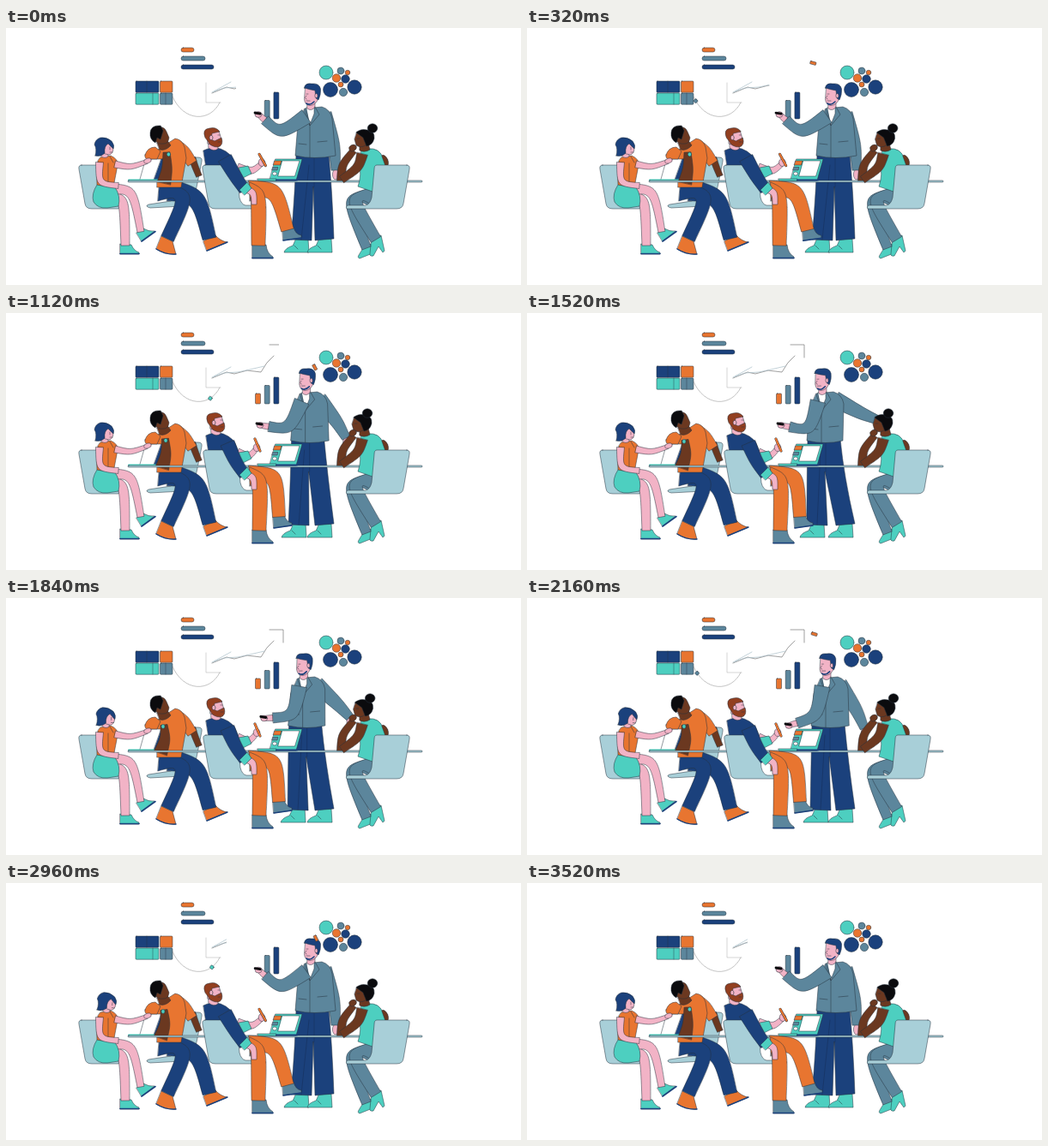
Animation, 600 px wide and 300 px high, one loop 3600 ms. Source, as an HTML page with a canvas:

```html
<!DOCTYPE html>
<html lang="en">
<head>
<meta charset="utf-8">
<title>Team meeting</title>
<style>
  html, body { margin: 0; width: 100%; height: 100%; overflow: hidden; background: #fff; }
  canvas { display: block; }
</style>
</head>
<body>
<canvas id="stage" width="600" height="300"></canvas>
<script>
const ctx = document.getElementById('stage').getContext('2d');
const NAVY = '#1b417c', ORANGE = '#e87530', TEAL = '#4dcfc0', SLATE = '#5c869c', CHAIR = '#a8cfd8',
      PINK = '#f2b3c6', BROWN = '#6b3820', RUST = '#923f20', BLACK = '#0b0b0e', INK = '#25313d';
const LOOP = 3600, STEP = 80;

const ramp = (t, from, to) => Math.max(0, Math.min(1, (t - from) / (to - from)));
const ease = (t, from, to) => { const u = ramp(t, from, to); return u * u * (3 - 2 * u); };

function shape(d, fill, stroke = INK, width = .5) {
  const path = d instanceof Path2D ? d : new Path2D(d);
  if (fill) { ctx.fillStyle = fill; ctx.fill(path); }
  if (stroke) { ctx.strokeStyle = stroke; ctx.lineWidth = width; ctx.stroke(path); }
}
const line = (d, color, width) => shape(d, null, color, width);

function oval(x, y, rx, ry, fill, turn = 0) {
  const path = new Path2D();
  path.ellipse(x, y, rx, ry, turn, 0, 7);
  shape(path, fill);
}

function box(x, y, w, h, r, fill) {
  const path = new Path2D();
  path.roundRect(x, y, w, h, r);
  shape(path, fill);
}

// Limb through start, joint and end, tapering from width w0 to w1
function limb(fill, w0, w1, x0, y0, x1, y1, x2, y2) {
  const edge = side => {
    const offset = (x, y, dx, dy, w) => {
      const k = side * w / 2 / Math.hypot(dx, dy);
      return `${x - dy * k} ${y + dx * k} `;
    };
    const joint = offset(x1, y1, x2 - x0, y2 - y0, (w0 + w1) / 2);
    return [offset(x0, y0, x1 - x0, y1 - y0, w0), joint + joint, offset(x2, y2, x2 - x1, y2 - y1, w1)];
  };
  const [a, b, c] = edge(1), [d, e, f] = edge(-1);
  shape(`M${a}C${b}${c}L${f}C${e}${d}Z`, fill);
}

function at(x, y, draw, turn = 0, flip = 1) {
  ctx.save();
  ctx.translate(x, y);
  ctx.rotate(turn);
  ctx.scale(flip, 1);
  draw();
  ctx.restore();
}

const chair = (x, flip, back, reach) => at(x, 160, () =>
  shape(`M4 0H${back - 3}Q${back} 0 ${back} 5L${back + 3} 38Q${back + 5} 46 ${back + 10} 47H${reach - 2}
    Q${reach + 1} 49 ${reach - 1} 51H16Q9 51 8 45L1 5Q0 0 4 0Z`, CHAIR), 0, flip);

function charts(t, handY) {
  [ORANGE, SLATE, NAVY].forEach((color, i) => box(204, 23 + 10 * i, 15 + 13 * i - 3 * (i > 1), 5, 2.5, color));
  [NAVY, ORANGE, TEAL, SLATE].forEach((color, i) =>
    box(i % 2 ? 179.5 : 151, i < 2 ? 62 : 76, i % 2 ? 14.5 : 27, 13.2, 1, color));
  line('M164 62V75M171 76V89M186 76V89', INK, .4);
  line('M233 64V87H250', '#aaa');
  line('M194 80C207 110 238 110 249 87', '#888');

  const edge = 268 + 67 * ramp(t, 0, 1500) - 78 * ease(t, 2250, 2960) + 11 * ramp(t, 3520, 3600);
  ctx.save();
  ctx.beginPath();
  ctx.rect(235, 30, edge - 235, 60);
  ctx.clip();
  line('M240 76L257 69 266 71 281 67 297 69 304 58 312 50M307 37H323V52', '#777', .7);
  line('M240 75L254 70 270 69 284 66 301 62M242 74L262 63', '#a9bfc9', .7);
  ctx.restore();

  const rise = ramp(handY, 103, 115);
  [ORANGE, SLATE, NAVY].forEach((color, i) => {
    const h = (12 + 9.5 * i) * (i ? 1 : rise);
    if (h) box(290.5 + 10.7 * i, 106 - h, 6, h, 1, color);
  });

  const bubble = (x, y, r, color) => oval(x, y, r, r, color);
  bubble(373, 52, 8, TEAL);
  bubble(390, 50, 4, SLATE);
  bubble(398, 52, 2.8, ORANGE);
  bubble(385, 58.5, 4.8, ORANGE);
  bubble(395.5, 59.5, 4.8, NAVY);
  bubble(390, 66, 3, ORANGE);
  bubble(378, 72, 8.5, NAVY);
  bubble(393, 75, 4.7, SLATE);
  bubble(406, 69, 8.2, NAVY);

  const u = ramp(t % 1800, 250, 1400), v = 1 - u;
  if (u > 0 && u < 1) {
    const bezier = (a, b, c, d) => a * v ** 3 + 3 * b * v * v * u + 3 * c * v * u * u + d * u ** 3;
    at(bezier(194, 207, 238, 249), bezier(80, 110, 110, 87),
      () => box(-2, -2, 4, 4, 1, u < .25 ? SLATE : TEAL), u * 2 + .6);
  }
}

function spark(t) {
  const u = ramp(t % 1800, 250, 1250);
  if (u > 0 && u < 1) at(331 + 33 * u, 39 + 28 * u, () => box(-3.5, -1.7, 7, 3.4, .6, ORANGE), .2 + u);
}

function gesture(t) {
  const drop = ease(t, 300, 1100), open = ease(t, 800, 1450), low = ease(t, 1560, 2100),
        settle = ease(t, 2200, 2640), raise = ease(t, 2400, 3000);
  return {
    lean: 360 - 11 * open + 5 * low + 6 * settle,
    hand: [295 + 2 * drop + 9 * low - 11 * raise, 101 + 30 * drop + 18 * low - 48 * raise],
    backHand: [384 + 25 * open - 16 * low - 9 * settle, 169 - 41 * open + 27 * low + 14 * settle],
    stride: 6 * open - 4 * low - 2 * settle
  };
}

// Elbow below the line from shoulder to hand, both arm bones of the same length
function elbow(sx, sy, hx, hy, bone) {
  const dx = hx - sx, dy = hy - sy, d = Math.hypot(dx, dy);
  const h = Math.sqrt(Math.max(0, bone * bone - d * d / 4)) / d;
  return [(sx + hx) / 2 + dy * h, (sy + hy) / 2 - dx * h];
}

function presenter({ lean, hand: [hx, hy], backHand: [bx, by], stride }) {
  const tilt = (360 - lean) / 11, hip = lean - 1, left = 344 - stride, right = 371;
  const [ex, ey] = elbow(lean - 13, 105, hx, hy, 33.5);
  oval(bx, by + 2, 3.6, 6, PINK);
  limb(SLATE, 19, 10, lean + 10, 101, (lean + 12 + bx) / 2 + 5, (103 + by) / 2 + 2, bx, by - 3);

  for (const x of [left, right])
    shape(`M${x - 6} 246L${x + 8} 246L${x + 9} 262H${x - 20}Q${x - 19} 257 ${x - 10} 254Z`, TEAL);
  line(`M${left - 8} 254l4 4M${right - 8} 254l4 4`);
  shape(`M${hip - 21} 147H${hip + 17}Q${hip + 21} 190 ${right + 11} 246L${right - 11} 248L${hip - 1} 185
    L${left + 12} 248L${left - 12} 247Q${hip - 22} 190 ${hip - 21} 147Z`, NAVY);
  line(`M${hip} 150V185M${hip - 6} 160L${left} 247`, '#142c56');

  shape(`M${lean - 12} 94L${lean + 8} 92Q${lean + 18} 95 ${lean + 20} 106L${hip + 25 - 5 * tilt} 149
    Q${hip} 154 ${hip - 22} 149L${lean - 20} 112Z`, SLATE);
  shape(`M${lean - 10} 93L${lean - 1} 91L${lean - 1} 100L${lean - 6} 113Z`, '#fff');
  shape(`M${lean - 9} 84H${lean}V92Q${lean - 4} 98 ${lean - 9} 94Z`, PINK);
  line(`M${lean - 12} 95L${lean - 6} 114L${lean + 5} 101L${lean} 92M${lean - 6} 114L${hip - 5} 151
    M${hip + 4} 133l11 -1M${hip - 18} 135l9 1`);

  at(lean - 5 - tilt, 78, () => {
    shape('M-6 -9Q1 -9 7 -7L9 4Q6 12 -1 12.5Q-7 12 -7.5 5Z', PINK);
    shape('M-7.5 -8Q-7 -14 1 -13Q10 -14 11.5 -7Q12 0 9 6L6 4L5 -5Q-1 -6 -7.5 -8Z', NAVY);
    oval(6.5, 1, 1.7, 2.5, PINK);
    line('M-5 10Q-1 13 4 8', NAVY, 1.6);
    line('M-5 -1h2M-5 1q-3 3 0 4M-5 7h4');
  }, -.05 * tilt);

  const cuff = [hx + (ex - hx) * .28, hy + (ey - hy) * .28];
  limb(PINK, 6, 7, hx, hy, hx + 3, hy + (ey - hy) * .15, ...cuff);
  oval(hx - 1, hy, 4, 3.4, PINK);
  line(`M${hx - 5} ${hy - 2}l6 1`, BLACK, 2.8);
  limb(SLATE, 12, 18, ...cuff, ex, ey, lean - 10, 103);
}

function restingMan(fold) {
  shape('M203 151H224Q229 151 228 156L222 186Q218 206 205 208L168 210Q161 208 166 206L192 202Z', CHAIR);
  shape('M181 243L194 249L198 264Q186 265 175 258Z', ORANGE);
  shape('M230 249L243 241Q250 249 258 250L234 260Z', ORANGE);
  line('M175 258Q186 265 198 264M234 260L258 250', NAVY, 1.4);
  limb(NAVY, 26, 16, 190, 189, 225, 196, 237, 246);
  limb(NAVY, 24, 16, 178, 190, 213, 193, 188, 246);
  limb(BROWN, 8, 7, 217, 152, 220, 161, 225, 173);
  limb(ORANGE, 16, 12, 198, 138, 208, 144, 217, 158);
  shape('M177 142L197 129Q205 130 208 139L210 152L204 186H176Z', ORANGE);
  shape('M176 134L187 130L192 137Q186 144 179 142Z', BROWN);
  shape('M174 117Q184 113 187 121L190 128Q189 135 184 135Q177 136 173 131Z', BROWN);
  shape('M180 114Q169 113 168 122Q167 130 174 134L176 128L180 130L183 120Z', BLACK);
  shape('M163 153H184L176 178H156Z', '#fff');
  shape('M181 153H186L178 178H172Z', NAVY);
  line('M143 177.5H180', TEAL, 1.8);
  limb(BROWN, 16, 8, 180 + 4 * fold, 181, 186 + 2 * fold, 164, 184 + 3 * fold, 148 - 3 * fold);
  shape('M162 148Q165 139 174 139L180 144L176 153H165Q161 152 162 148Z', ORANGE);
  oval(183 + 6.5 * fold, 150 - 2.5 * fold, 2.2, 2.4, TEAL);
}

function table() {
  box(142, 178, 343, 2, 1, CHAIR);
  shape('M314 153H345L338 178H307Z', TEAL);
  shape('M322 155H342L336.5 173H317Z', '#fff');
  shape('M313 155H321L319.5 160H311.5Z', ORANGE);
  shape('M311 162.5H317L316 166H310Z', SLATE);
  oval(313, 170, 2.6, 2, '#fff');
  shape('M293 176H315V178.5H294Z', TEAL);
  line('M315 177.5H339', NAVY, 2);
}

function seatedWoman(nod) {
  chair(84, 1, 26, 48);
  shape('M133 252L146 253Q149 260 155 262V264H133Z', TEAL);
  shape('M152 239L160 234Q167 238 173 237L158 249Z', TEAL);
  line('M133 263.5H155M158 249L174 237.5', NAVY, 1.6);
  limb(PINK, 15, 10, 122, 198, 138, 198, 139, 254);
  limb(PINK, 15, 8, 118, 189, 148, 187, 157, 238);
  shape('M106 183Q99 194 102 203Q107 211 118 210L131 208Q134 196 127 186Z', TEAL);
  shape('M110 151L122 149Q131 153 130 160L126 181Q116 186 106 183Q105 168 107 155Z', ORANGE);
  line('M121 150L125 157M119 158V181');
  limb(PINK, 9, 7, 109, 157, 108, 182, 131, 184);
  limb(PINK, 8, 5, 127, 159, 145, 163, 164, 156);
  oval(165, 155, 4.5, 2.8, PINK, -.3);
  at(114 + 3 * nod, 139, () => {
    shape('M-3 5H5V11Q1 14 -3 11Z', PINK);
    shape('M-2 -7H8L11 1Q11 8 6 9L-2 7Z', PINK);
    shape('M-10 10Q-8 2 -11 -3Q-10 -9 -4 -11Q3 -12 9 -7Q13 -2 11 2L5 -4Q0 -1 1 7Q-4 12 -10 10Z', NAVY);
    line('M7 0v3M7 6h3');
  }, .1 * nod);
}

function beardedMan(r) {
  at(11 * r, -3 * r, () => {
    shape('M311 238L324 235Q326 244 333 245V248L312 251Z', SLATE);
    line('M312 251L333 248', NAVY, 1.5);
  });
  shape('M287 253H303Q304 263 311 267V269H287Z', SLATE);
  line('M287 268.5H311', NAVY, 1.5);
  at(-3 * r, 0, () => {
    shape('M233 143Q242 138 253 141Q266 146 269 157L280 187L264 197Q244 186 236 163Z', NAVY);
    shape('M239 135H250V141Q245 145 239 140Z', PINK);
    shape('M238 120H251L254 130Q254 136 247 138L238 135Z', PINK);
    shape('M235 128Q231 118 240 117Q248 115 252 121L243 123L242 130L246 132L254 128Q257 137 250 139Q241 139 238 132Z', RUST);
    oval(242, 128, 2, 2.7, PINK);
    line('M250 125h2M250 133h3');
  });
  chair(229 - r, 1, 41, 75);
  limb(ORANGE, 24, 15, 284, 190, 315, 187, 318 + 10 * r, 238 - 2 * r);
  limb(ORANGE, 22, 16, 284, 191, 297 - 2 * r, 191, 295 - r, 254);

  limb(PINK, 10, 6, 270, 163, 284 + 3 * r, 168, 291 + 6 * r, 159);
  shape('M271 163L282 161L286 170L276 175Z', TEAL);
  at(292 + 6 * r, 157, () => {
    oval(0, 0, 3.8, 4.5, PINK);
    line('M-2 -10L4 4', INK, 3);
    line('M-2 -10L4 4', ORANGE, 2.2);
  }, -.1 * r);
  limb(PINK, 9, 6, 279, 188, 289, 192, 289, 206);
  limb(NAVY, 17, 13, 258 - 3 * r, 152, 267, 173, 278, 189);
  shape('M272 189L281 180L286 187L278 195Z', TEAL);
}

function thinkingWoman(turn) {
  shape('M418 254L426 252L427 263L412 269Q409 268 411 265Z', TEAL);
  shape('M426 246L437 242L441 260L439 262L434 255L428 266Q423 267 424 263Z', TEAL);
  limb(SLATE, 22, 11, 426, 198, 397, 197, 420, 257);
  limb(SLATE, 24, 13, 430, 197, 400, 196, 431, 247);
  oval(441, 155, 4, 7, BROWN, -.4);
  limb(BROWN, 11, 8, 391, 178, 391, 160, 405, 143);
  shape('M414 143Q430 137 437 147L443 164L430 192L410 185Q415 171 411 157Z', TEAL);
  limb(BROWN, 13, 9, 415, 147, 411, 163, 391, 177);
  shape('M412 134H422L424 142Q418 146 412 143Z', BROWN);
  at(-3 * turn, 0, () => {
    shape('M409 121L421 123L420 136Q414 141 408 137L406 130Z', BROWN);
    shape('M408 122Q413 117 421 119Q430 121 429 129Q427 137 420 138L416 128Z', BLACK);
    oval(427 - 3 * turn, 117, 5.8, 5.3, BLACK);
    line('M409 129h3');
  });
  oval(404, 140, 4.5, 3.6, BROWN, -.5);
  chair(471, -1, 42, 75);
}

function draw(now) {
  const t = Math.floor(now % LOOP / STEP) * STEP;
  const speaker = gesture(t);
  ctx.clearRect(0, 0, 600, 300);
  ctx.lineJoin = ctx.lineCap = 'round';
  charts(t, speaker.hand[1]);
  presenter(speaker);
  spark(t);
  restingMan(1 - ease(t, 720, 1500) + ease(t, 2960, 3500));
  table();
  seatedWoman(ease(t, 1500, 2100) - ease(t, 2960, 3500));
  beardedMan(1 - ease(t, 200, 800) + ease(t, 2300, 2960));
  thinkingWoman(ease(t, 200, 700) - ease(t, 1560, 2100));
}

const start = performance.now();
(function frame() {
  draw(performance.now() - start);
  requestAnimationFrame(frame);
})();
</script>
</body>
</html>
```
